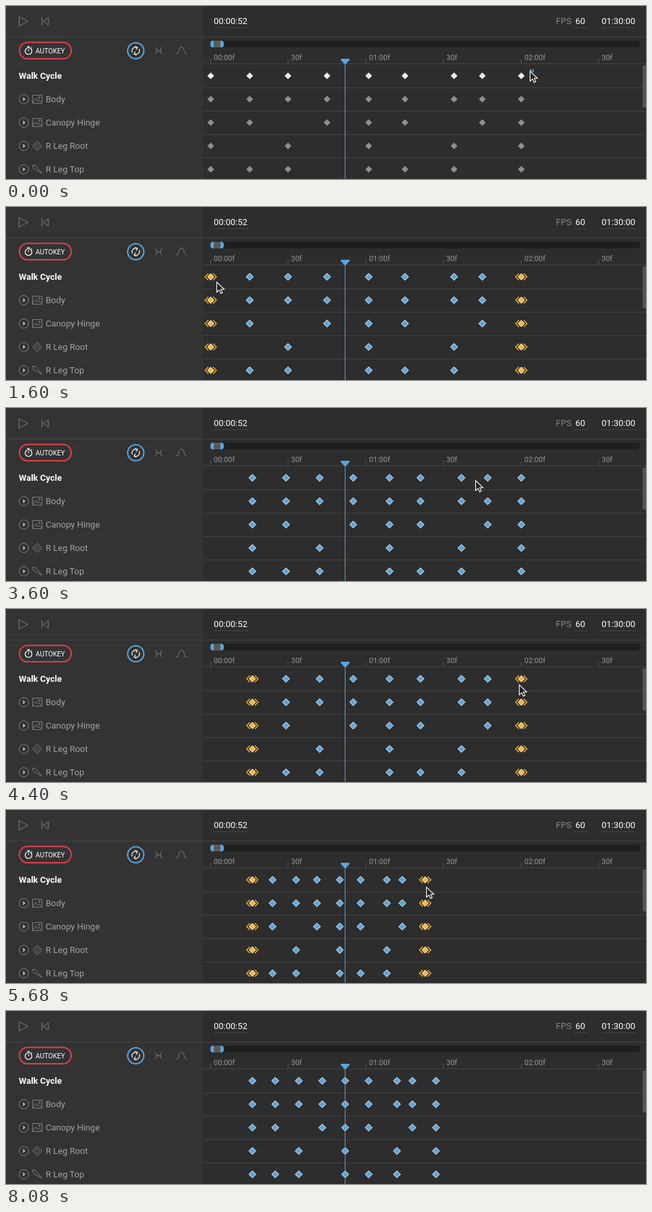
An HTML page that plays this animation: 952 px wide and 259 px high, repeating every 8560 ms.

```html
<!DOCTYPE html>
<html lang="en">
<head>
<meta charset="utf-8">
<title>Timeline key scaling</title>
<style>
html, body { margin: 0; width: 100%; height: 100%; overflow: hidden; background: #2d2d2d; }
svg { display: block; font: 13px Roboto, Arial, sans-serif; }
.line { fill: none; stroke: #808080; }
.small { font-size: 11px; fill: #999; }
</style>
</head>
<body>
<svg width="952" height="259" viewBox="0 0 952 259">
  <rect width="952" height="259" fill="#2d2d2d"/>
  <rect width="294" height="259" fill="#333"/>
  <path d="M0 46.5H952M294 86.5H952M294 122.5H952M294 157.5H952M294 192.5H952M294 227.5H952" stroke="#434343"/>

  <!-- transport -->
  <path class="line" d="M19.5 16V30L32.5 23ZM53.5 17V29M63 17.5V28.5L55.5 23Z"/>
  <g fill="#fff">
    <text x="309" y="27">00:00:52</text>
    <text x="818" y="27" fill="#888">FPS</text>
    <text x="847" y="27">60</text>
    <text x="886" y="27">01:30:00</text>
  </g>
  <path d="M309 32.5H360M845 32.5H865M885 32.5H937" stroke="#444"/>

  <!-- tools -->
  <rect x="20" y="54.5" width="77" height="24.5" rx="12.2" fill="none" stroke="#e0404c" stroke-width="2"/>
  <g fill="none" stroke="#fff" stroke-width="1.2">
    <circle cx="33.5" cy="67.5" r="5"/>
    <path d="M31.5 60.8H35.5M33.5 61V62.5M33.5 67.5V64.5M37.5 63L38.7 62"/>
    <path id="loop" d="M188 69.5A5.5 5.5 0 0 1 195 62M192 60.5L195.5 62L193.5 65.5M198 64.5A5.5 5.5 0 0 1 191 72M194 73.5L190.5 72L192.5 68.5"/>
  </g>
  <text x="44" y="71" fill="#fff" font-size="10">AUTOKEY</text>
  <circle cx="193" cy="67" r="12" fill="none" stroke="#57a5e0" stroke-width="2"/>
  <path class="line" d="M221.5 62Q224.5 63 224.5 67T221.5 72M232.5 62Q229.5 63 229.5 67T232.5 72M224 67H230M253 71.5H254C258 71.5 256 61.5 261 61.5S264 71.5 268 71.5H269"/>

  <!-- track names -->
  <text x="19" y="109" fill="#fff" font-weight="700">Walk Cycle</text>
  <g id="names" fill="#a3a3a3"></g>

  <!-- ruler -->
  <rect x="304" y="52" width="640" height="10" rx="5" fill="#1f1f1f"/>
  <rect x="304" y="52" width="20" height="10" rx="4" fill="#57a5e0"/>
  <rect x="309" y="52" width="10" height="10" fill="#595959"/>
  <g id="ruler"></g>
  <path d="M952 89H949Q947 89 947 91V150Q947 152 949 152H952Z" fill="#555"/>

  <rect id="marquee" fill="#57a5e0" fill-opacity=".35" stroke="#57a5e0"/>
  <g id="keys"></g>
  <path d="M504.5 80V259" stroke="#57a5e0"/>
  <path d="M498 79H511V81L504.5 88L498 81Z" fill="#57a5e0"/>
  <path id="cursor" d="M0 0V15L3.6 11.8L6 17L8.5 15.9L6.2 10.8H11Z" fill="#222" stroke="#fff" stroke-width="1.1"/>
</svg>
<script>
const LOOP = 8560, STEP = 80, LAST = 120, FRAME_WIDTH = 3.849;
const $ = id => document.getElementById(id);
const frameX = f => Math.round(304 + FRAME_WIDTH * f) + 0.5;
const rowY = row => 104.5 + 35 * row;

const diamond = (x, y, r, fill, stroke = "none") =>
  `<path d="M${x - r} ${y}L${x} ${y - r}L${x + r} ${y}L${x} ${y + r}Z" fill="${fill}" stroke="${stroke}"/>`;
const chevron = (x, y, side) =>
  `<path d="M${x + side * 3.5} ${y - 5}L${x + side * 8.5} ${y}L${x + side * 3.5} ${y + 5}" fill="none" stroke="#fbb632" stroke-width="1.3"/>`;

const picture = '<path class="line" d="M39.5 -6H53.5V6H39.5ZM40 5L44 -1L47 3L49 1L53 5"/><circle class="line" cx="49.5" cy="-2.5" r="1.3"/>';
const root = diamond(46.5, 0, 7, "none", "#808080") + diamond(46.5, 0, 3.5, "none", "#808080");
const bone = '<path class="line" d="M39.5 -6H43.5L53.5 6L41 -1Z"/>';
const tracks = [["Body", picture], ["Canopy Hinge", picture], ["R Leg Root", root], ["R Leg Top", bone]];

$("names").innerHTML = tracks.map(([name, icon], i) =>
  `<g transform="translate(0 ${rowY(i + 1)})"><circle class="line" cx="26.5" cy="0" r="7"/>
  <path d="M25.5 -2L27.5 0L25.5 2" fill="none" stroke="#fff" stroke-width="1.2"/>
  ${icon}<text x="59" y="4.5">${name}</text></g>`).join("");

$("ruler").innerHTML = ["00:00f", "30f", "01:00f", "30f", "02:00f", "30f"].map((label, i) => {
  const x = frameX(30 * i);
  return `<path d="M${x} 79V86" stroke="#555"/><text class="small" x="${x + 4.5}" y="81">${label}</text>`;
}).join("");

const keyFrames = [0, 15, 30, 45, 61, 75, 94, 105, LAST];
const rows = ["012345678", "012345678", "0134578", "02468", "0124568"];

// Each move is [begin, finish, goal]; the value eases there and rests until the next.
const firstKey = [[2170, 2570, 16]];
const lastKey = [[4480, 5040, 115.9], [5040, 5440, 81.9], [5600, 5920, 87.35]];

// Pointer moves leave out the distance covered while dragging a key.
const pointer = [
  [0, 800, 298, 112], [1120, 1200, 313, 112], [1680, 2000, 309, 106],
  [2960, 3760, 674, 108], [3840, 4400, 701, 113], [5040, 5440, 707, 115],
  [7120, 7520, 34, 180], [7520, 7600, 34, 280], [7600, 7680, 424, 280],
  [7680, 7880, 504, 168], [7880, 8080, 714, 280]
];

function ease(t, begin, finish) {
  const u = Math.min(1, Math.max(0, (t - begin) / (finish - begin)));
  return u * u * (3 - 2 * u);
}

const follow = (moves, t, ...from) => moves.reduce((now, [begin, finish, ...goal]) =>
  now.map((v, i) => v + (goal[i] - v) * ease(t, begin, finish)), from);

function keyMark(x, y, row, selected, handle) {
  if (!selected) return diamond(x, y, 5, row ? "#8f8f8f" : "#f0f0f0");
  if (!handle) return diamond(x, y, 5.3, "#57a5e0", "#fff");
  return chevron(x, y, -1) + chevron(x, y, 1) + diamond(x, y, 4.8, "#fbb632", "#fff");
}

function draw(now) {
  const t = Math.floor(now % LOOP / STEP) * STEP;
  const [start] = follow(firstKey, t, 0), [end] = follow(lastKey, t, LAST);
  const [x, y] = follow(pointer, t, 779, 97);
  const cx = Math.round(x + FRAME_WIDTH * (start + end - LAST)), cy = Math.round(y);
  const handles = t >= 1360 && t < 2800 || t >= 3760 && t < 6560;

  const places = keyFrames.map(f => {
    const moved = Math.round(LAST - (LAST - f) * (LAST - start) / LAST);
    return frameX(Math.round(start + (moved - start) * (end - start) / (LAST - start)));
  });
  $("keys").innerHTML = rows.map((row, r) => [...row].map(i =>
    keyMark(places[i], rowY(r), r, t >= 800 || places[i] > cx, handles && (i == 0 || i == 8))
  ).join("")).join("");

  const box = $("marquee"), left = Math.min(781, cx) + 0.5;
  box.style.display = t < 1120 ? "" : "none";
  if (t < 1120) {
    box.setAttribute("x", left);
    box.setAttribute("y", 95.5);
    box.setAttribute("width", 784.5 - left);
    box.setAttribute("height", cy - 94);
  }
  $("cursor").setAttribute("transform", `translate(${cx + 0.5} ${cy + 0.5})`);
  requestAnimationFrame(draw);
}
requestAnimationFrame(draw);
</script>
</body>
</html>
```
